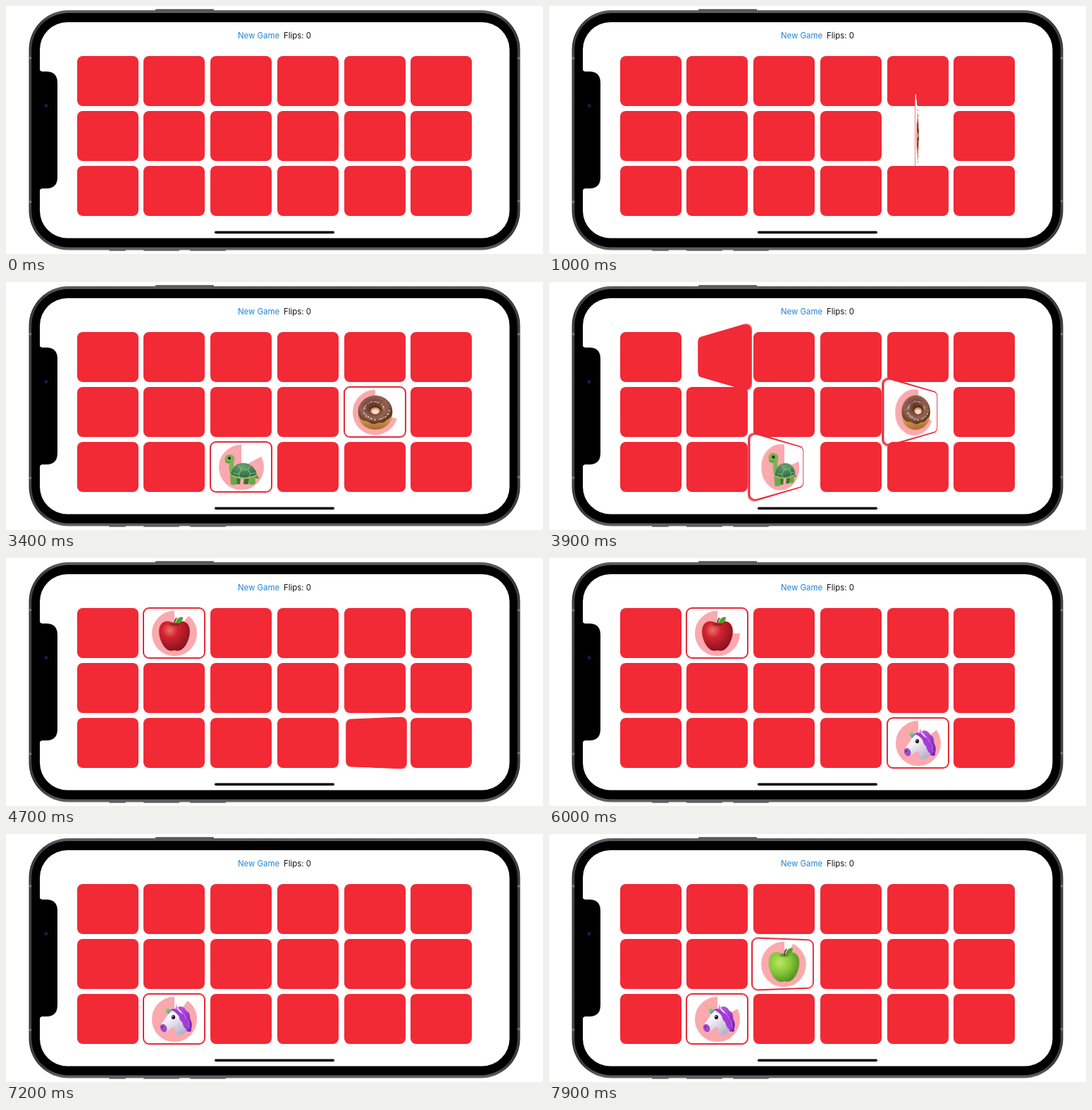
Animation, 762 px wide and 352 px high, one loop 8 s. Source, as an HTML page:

```html
<!DOCTYPE html>
<html lang="en">
<head>
<meta charset="utf-8">
<title>Memory game</title>
<style>
html, body { margin: 0; width: 100%; height: 100%; overflow: hidden; background: #fff; }
#stage { position: relative; width: 762px; height: 352px; overflow: hidden; }
#stage > svg { position: absolute; left: 0; top: 0; }
.label { font: 11.4px Inter, "Liberation Sans", sans-serif; }
.card {
  position: absolute; width: 87.3px; height: 71px;
  transform: perspective(88px) rotateY(180deg);
  transform-style: preserve-3d;
}
.back, .face { position: absolute; backface-visibility: hidden; box-sizing: border-box; }
.back { inset: 0; border-radius: 8px; background: #f12a36; transform: rotateY(180deg); }
.face { inset: -1.2px; border-radius: 9px; border: 2.3px solid #e42c39; background: #fff; }
.face svg { position: absolute; left: 50%; top: 50%; width: 80px; height: 66px; margin: -33px 0 0 -40px; }
.pie { fill: none; stroke: #faa9ae; stroke-width: 32; stroke-dasharray: 360 360; }
</style>
</head>
<body>
<div id="stage">
  <svg width="762" height="352">
    <defs>
      <linearGradient id="rim" x2="0" y2="1">
        <stop offset="0" stop-color="#626265"/><stop offset=".05" stop-color="#333335"/>
        <stop offset=".95" stop-color="#333335"/><stop offset="1" stop-color="#68686a"/>
      </linearGradient>
      <radialGradient id="red" cx=".35" cy=".3" r=".75">
        <stop offset="0" stop-color="#f0706a"/><stop offset=".35" stop-color="#d0232f"/><stop offset="1" stop-color="#85101f"/>
      </radialGradient>
      <radialGradient id="green" cx=".35" cy=".35" r=".75">
        <stop offset="0" stop-color="#bfe765"/><stop offset=".5" stop-color="#83c436"/><stop offset="1" stop-color="#47861d"/>
      </radialGradient>
      <linearGradient id="dough" x2="0" y2="1">
        <stop offset=".5" stop-color="#e3ac61"/><stop offset="1" stop-color="#a9682b"/>
      </linearGradient>
      <radialGradient id="icing" cx=".45" cy=".4" r=".6">
        <stop offset=".2" stop-color="#6a3b2d"/><stop offset=".65" stop-color="#956253"/><stop offset="1" stop-color="#57301f"/>
      </radialGradient>
      <radialGradient id="shell" cx=".45" cy=".25" r=".8">
        <stop offset="0" stop-color="#68a673"/><stop offset="1" stop-color="#205c40"/>
      </radialGradient>
      <linearGradient id="coat" x2=".7" y2="1">
        <stop offset=".4" stop-color="#f8f5fb"/><stop offset="1" stop-color="#b9b1cb"/>
      </linearGradient>
      <linearGradient id="mane" x2=".6" y2="1">
        <stop offset="0" stop-color="#c45be8"/><stop offset="1" stop-color="#7424b4"/>
      </linearGradient>
      <linearGradient id="horn" x2="1" y2="1">
        <stop offset="0" stop-color="#f08a9a"/><stop offset=".35" stop-color="#f0c35c"/>
        <stop offset=".65" stop-color="#58bf9d"/><stop offset="1" stop-color="#5b79d2"/>
      </linearGradient>
      <path id="fruit" d="M0-13C5-18 14-19 19-13C24-6 22 6 17 15C12 24 6 26 0 24C-6 26-12 24-17 15C-22 6-24-6-19-13C-14-19-5-18 0-13Z"/>
      <g id="leaf">
        <path d="M0-12Q0-18 3-22" fill="none" stroke="#6d4524" stroke-width="2"/>
        <path d="M2-15C3-22 8-24 12-23C12-17 8-13 2-15Z" fill="#54a72e"/>
        <path d="M3-16Q7-18 11-22" fill="none" stroke="#337b22" stroke-width=".7"/>
      </g>
      <g id="redApple">
        <use href="#fruit" fill="url(#red)"/>
        <ellipse cy="-13" rx="7" ry="2.5" fill="#7d1420" opacity=".6"/>
        <use href="#leaf"/>
      </g>
      <g id="greenApple">
        <use href="#fruit" fill="url(#green)"/>
        <ellipse cy="-13" rx="7" ry="2.5" fill="#437c1c" opacity=".6"/>
        <use href="#leaf"/>
      </g>
      <g id="donut">
        <ellipse cy="4" rx="24" ry="20.5" fill="url(#dough)"/>
        <path d="M-24.3-2C-24-15-12-24 0-24S24-15 24.3-2C25 6 20 9 16 11C11 17 6 13 1 16C-5 18-9 13-14 12C-20 12-25 6-24.3-2Z" fill="url(#icing)"/>
        <ellipse cy="-3" rx="8.5" ry="6.5" fill="#4f291c"/>
        <ellipse cy="-2" rx="7" ry="5" fill="#d69a56"/>
        <ellipse cy="-1" rx="5" ry="3.4" fill="#fbd8d5"/>
        <g id="sprinkles" stroke-width="1.5" stroke-linecap="round"></g>
      </g>
      <g id="turtle">
        <path d="M18 8Q24 11 25 16Q18 16 14 13Z" fill="#54953f"/>
        <path d="M4 14H11L10 24H3ZM-8 14H-1L-2 24H-9Z" fill="#39742f"/>
        <path d="M-16 10H-7L-6 24Q-11 26-15 24ZM10 12H19L20 23Q16 26 11 24Z" fill="#69a849"/>
        <path d="M-23-9C-25-15-20-19-15-18C-9-17-9-11-11-7C-12-2-9 2-6 5L-12 13C-18 9-18 1-17-5Q-22-5-23-9Z" fill="#7bb452"/>
        <path d="M-23-8Q-19-6-16-8" fill="none" stroke="#3f7c33" stroke-width=".8"/>
        <circle cx="-17" cy="-13" r="1.9" fill="#151d15"/>
        <path d="M-15 11C-14 0-7-6 3-6C13-6 21 2 22 11Q4 21-15 11Z" fill="url(#shell)"/>
        <path d="M-4-3L0 3L-4 10L-12 8M0 3H9L13 9L10 16M9 3L13-2M13 9L21 8M-4 10L-2 16" fill="none" stroke="#93bd75" stroke-width="1.1"/>
        <path d="M-15 11Q4 20 22 11" fill="none" stroke="#a5b765" stroke-width="2"/>
      </g>
      <g id="unicorn">
        <path d="M3-16C10-22 16-15 17-12C24-9 21-3 23 1C27 8 23 13 24 17C19 19 16 16 13 13L1-4Z" fill="url(#mane)"/>
        <path d="M-6-12C-1-17 8-16 11-9C16 1 18 12 17 17C12 23 5 24 2 22C2 16 2 13-1 11C-5 12-8 16-13 18C-18 19-21 14-20 9C-17 4-12-1-10-6Z" fill="url(#coat)"/>
        <path d="M-20 9C-17 5-13 7-11 11C-10 15-11 17-13 18C-18 19-21 14-20 9Z" fill="#a14bc6"/>
        <circle cx="-17" cy="11" r="1.1" fill="#4c1a70"/>
        <path d="M-9-7L-18-21L-4-12Z" fill="url(#horn)"/>
        <path d="M-1-13L3-23L7-12Z" fill="#e9e2f2"/><path d="M1-14L3-20L5-13Z" fill="#cf83ce"/>
        <path d="M-6-13C0-18 6-13 9-9C16-7 14-1 17 3C21 7 18 12 21 16C14 15 12 8 11 4C6 1 8-5 3-8Q0-12-6-13Z" fill="#a33bd5"/>
        <path d="M9-11C16-7 15-1 19 2C21 6 19 10 22 13" fill="none" stroke="#d686ef" stroke-width="1"/>
        <ellipse cx="-1.5" cy="-3" rx="2.6" ry="3" fill="#17131d"/>
        <circle cx="-2.3" cy="-4" r=".8" fill="#fff"/>
      </g>
    </defs>
    <g fill="#444446">
      <rect x="212" y="4.5" width="83" height="4" rx="1"/>
      <rect x="146" y="343" width="24" height="4.5" rx="1"/>
      <rect x="195" y="343" width="51" height="4.5" rx="1"/>
      <rect x="261" y="343" width="51" height="4.5" rx="1"/>
    </g>
    <rect x="32.5" y="6" width="697" height="340.5" rx="56" fill="url(#rim)"/>
    <rect x="34.5" y="8" width="693" height="336.5" rx="54" fill="none" stroke="#59595b" stroke-width=".8"/>
    <rect x="36.5" y="10" width="689" height="332.5" rx="52"/>
    <path d="M33 74h3M33 278h3M726 74h3M726 277h3" stroke="#77777a" stroke-width="3"/>
    <rect x="48" y="23" width="666.5" height="306.5" rx="39" fill="#fff"/>
    <path d="M46 86C48 93 50 93 54 93H57Q73 93 73 109V243Q73 259 57 259H54C50 259 48 259 46 266Z"/>
    <circle cx="57" cy="141.5" r="3" fill="#10102e"/><circle cx="57" cy="141.5" r="1.3" fill="#25256a"/>
    <text class="label" x="329" y="46" fill="#1b84da">New Game</text>
    <text class="label" x="394" y="46" fill="#111">Flips: 0</text>
  </svg>
  <div id="cards"></div>
  <svg width="762" height="352"><rect x="296" y="319.4" width="170" height="3.6" rx="1.8"/></svg>
</div>
<script>
const LOOP = 8000, FLIP = 650, GAP_SPEED = 0.039; // ms, ms, degrees per ms

// Times in ms at which each played card turns up and down again.
const plays = [
  { col: 4, row: 1, art: 'donut', up: 670, down: 3700 },
  { col: 2, row: 2, art: 'turtle', up: 1830, down: 3700 },
  { col: 1, row: 0, art: 'redApple', up: 3700, down: 6297 },
  { col: 4, row: 2, art: 'unicorn', up: 4620, down: 6297 },
  { col: 1, row: 2, art: 'unicorn', up: 6297 },
  { col: 2, row: 1, art: 'greenApple', up: 7330 }
];

const loop = (el, frames) => el.animate(frames, { duration: LOOP, iterations: Infinity });
const turn = (time, angle, easing = 'linear') =>
  ({ offset: time / LOOP, transform: `perspective(88px) rotateY(${angle}deg)`, easing });
const gap = (time, angle) => ({ offset: time / LOOP, strokeDashoffset: -angle });

function animateCard(card, { up, down }) {
  const flips = [turn(0, 180), turn(up, 180, 'ease-in-out'), turn(up + FLIP, 0)];
  if (down) flips.push(turn(down, 0, 'ease-in-out'), turn(down + FLIP, 180), turn(LOOP, 180));
  else flips.push(turn(LOOP, 0));
  loop(card, flips);

  const stop = down || LOOP, lost = (stop - up) * GAP_SPEED;
  const gaps = [gap(0, 0), gap(up, 0), gap(stop, lost)];
  if (down) gaps.push(gap(LOOP, lost));
  loop(card.querySelector('.pie'), gaps);
}

function addCard(col, row) {
  const play = plays.find(p => p.col === col && p.row === row);
  const card = document.createElement('div');
  card.className = 'card';
  card.style.left = 100.7 + 94.7 * col + 'px';
  card.style.top = 70.6 + 78.2 * row + 'px';
  card.innerHTML = '<div class="back"></div>';
  if (play) {
    card.innerHTML += `<div class="face"><svg viewBox="-40 -33 80 66">
      <circle class="pie" r="16" pathLength="360" transform="rotate(-90)"/>
      <use href="#${play.art}"/></svg></div>`;
  }
  document.getElementById('cards').append(card);
  if (play) animateCard(card, play);
}

function addSprinkles() {
  const colors = ['#ee79b2', '#f3dd72', '#78c9db', '#8dca68', '#f4eee4'];
  let marks = '';
  for (let i = 0; i < 30; i++) {
    const a = i * 2.4, r = 0.52 + 0.36 * (i * 0.618 % 1);
    const x = 23 * r * Math.cos(a), y = 18 * r * Math.sin(a) - 4;
    marks += `<path d="M${x} ${y}l${Math.cos(i * 1.7)} ${Math.sin(i * 1.7)}" stroke="${colors[i % 5]}"/>`;
  }
  document.getElementById('sprinkles').innerHTML = marks;
}

addSprinkles();
for (let row = 0; row < 3; row++)
  for (let col = 0; col < 6; col++) addCard(col, row);
</script>
</body>
</html>
```
